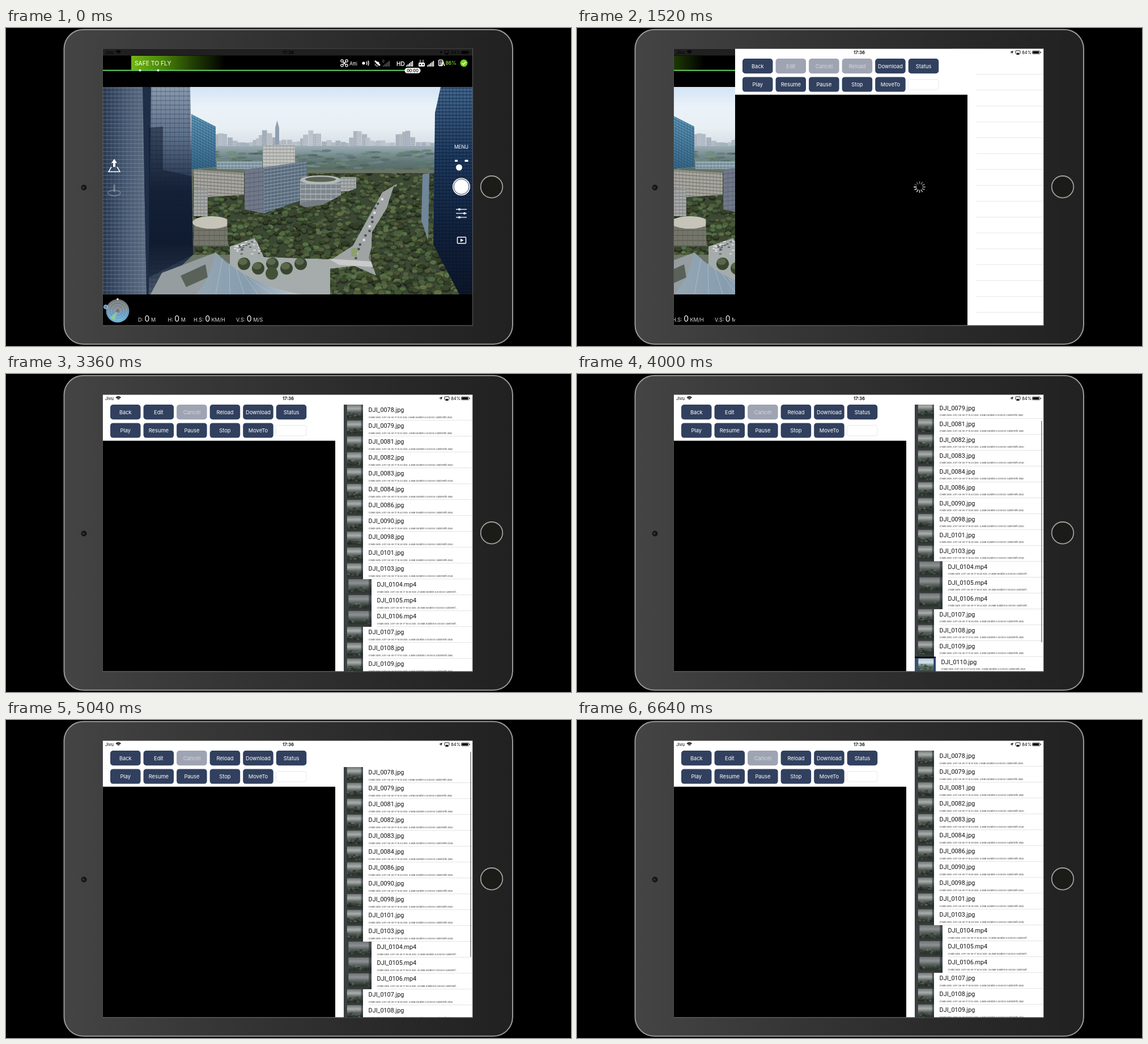
Write an HTML page with a canvas that moves like this. It is 997 px wide and 561 px high and loops after 7200 ms.

```html
<!DOCTYPE html>
<html lang="en">
<head>
<meta charset="utf-8">
<title>Media list</title>
<style>
html, body { margin: 0; width: 100%; height: 100%; overflow: hidden; background: #000; }
canvas { display: block; }
</style>
</head>
<body>
<canvas id="stage" width="997" height="561"></canvas>
<script>
const LOOP = 7200, STEP = 80;
const SCREEN = { x: 171, y: 36.5, w: 652, h: 488 };
const PUSH_START = 1295, PUSH_TIME = 500, LIST_READY = 1900, SCROLL_START = 3840;
const LIST_X = 596, LIST_Y = 54, ROW = 28, LIST_H = 471, SCROLL_MAX = 89;
let c = document.getElementById('stage').getContext('2d');

const clamp = (v, a = 0, b = 1) => Math.min(b, Math.max(a, v));
const smooth = u => { u = clamp(u); return u * u * (3 - 2 * u); };

function seeded(s) {
  return () => (s = (s * 16807) % 2147483647) / 2147483647;
}

const pad = (n, size = 2) => String(n).padStart(size, '0');

function makeFiles() {
  const rnd = seeded(41);
  const ids = [78, 79, 81, 82, 83, 84, 86, 90, 98, 101];
  for (let id = 103; id < 113; id++) ids.push(id);
  return ids.map(id => {
    const bright = id >= 110;
    const ext = id === 112 ? 'mov' : id > 103 && id < 107 ? 'mp4' : 'jpg';
    const video = ext !== 'jpg';
    const secs = bright ? 6 + (id - 110) * 70 : 16 + Math.round((id - 78) * 1.75) * 2;
    const time = `17:${pad((bright ? 32 : 15) + Math.floor(secs / 60))}:${pad(secs % 60)}`;
    const size = (video ? 23 + 15 * rnd() : 3.8 + .7 * rnd()).toFixed(1);
    const length = (video ? 6 + Math.floor(6 * rnd()) : 0).toFixed(6);
    return {
      name: `DJI_${pad(id, 4)}.${ext}`,
      info: `Create Date: 2017-08-${bright ? 10 : '09'} ${time} Size: ${size}MB Duration:${length} `,
      video, bright, width: video ? 49 : bright ? 37 : 34
    };
  });
}

// A quick pull past the edge that springs back.
function bounce(t, start, span) {
  const u = Math.max(0, (t - start) / span);
  return u * Math.exp(1 - u);
}

function scrollAt(t) {
  const glide = smooth((t - SCROLL_START) / 400) - smooth((t - 4680) / 320);
  return SCROLL_MAX * glide + 6 * bounce(t, 4160, 60) - 29 * bounce(t, 4920, 120);
}

function rect(x, y, w, h, fill) {
  c.fillStyle = fill;
  c.fillRect(x, y, w, h);
}

function paint(fill, stroke, width = 1) {
  if (fill) { c.fillStyle = fill; c.fill(); }
  if (stroke) { c.strokeStyle = stroke; c.lineWidth = width; c.stroke(); }
}

function round(x, y, w, h, r, fill, stroke, width) {
  c.beginPath();
  c.roundRect(x, y, w, h, r);
  paint(fill, stroke, width);
}

function oval(x, y, rx, ry, fill, stroke, width) {
  c.beginPath();
  c.ellipse(x, y, rx, ry, 0, 0, Math.PI * 2);
  paint(fill, stroke, width);
}

const circle = (x, y, r, fill, stroke, width) => oval(x, y, r, r, fill, stroke, width);

function arc(x, y, r, mid, half, color, width) {
  c.beginPath();
  c.arc(x, y, r, mid - half, mid + half);
  paint(null, color, width);
}

function trace(points, close) {
  c.beginPath();
  points.split(' ').forEach(p => c.lineTo(...p.split(',').map(Number)));
  if (close) c.closePath();
}

function poly(points, fill) {
  trace(points, true);
  paint(fill);
}

function line(points, color, width = 1) {
  trace(points);
  paint(null, color, width);
}

function fade(x0, y0, x1, y1, ...colors) {
  const g = c.createLinearGradient(x0, y0, x1, y1);
  colors.forEach((color, i) => g.addColorStop(i / (colors.length - 1), color));
  return g;
}

function text(str, x, y, size, color, { align = 'left', weight = 400, face = 'Inter' } = {}) {
  c.font = `${weight} ${size}px ${face}, sans-serif`;
  c.textAlign = align;
  c.fillStyle = color;
  c.fillText(str, x, y);
  return c.measureText(str).width;
}

function clipped(path, draw) {
  c.save();
  path();
  c.clip();
  draw();
  c.restore();
}

function window_(x, y, w, h, draw) {
  clipped(() => { c.beginPath(); c.rect(x, y, w, h); }, draw);
}

function cached(draw) {
  const sheet = document.createElement('canvas');
  sheet.width = 997;
  sheet.height = 561;
  const keep = c;
  c = sheet.getContext('2d');
  draw();
  c = keep;
  return sheet;
}

// Leafy clumps inside an outline, shaded from far to near.
function trees(area, seed) {
  const rnd = seeded(seed);
  clipped(() => trace(area, true), () => {
    rect(330, 250, 493, 220, '#3a4834');
    for (let i = 0; i < 1800; i++) {
      const near = i / 1800, x = 330 + 493 * rnd(), y = 250 + 220 * near;
      const r = 3 + 3 * near + 3 * rnd(), hue = 78 + 24 * rnd(), light = 18 + 19 * rnd();
      oval(x, y + 2, r, r * .7, `hsl(${hue},18%,${light * .65}%)`);
      oval(x, y, r * .8, r * .5, `hsl(${hue},23%,${light}%)`);
    }
  });
}

// A wall whose top and bottom edges lean by the given amounts.
function wall(x, y, w, h, fill, grid, lean = 0, rise = lean, gap = 6) {
  const area = `${x},${y} ${x + w},${y + lean} ${x + w},${y + h + rise} ${x},${y + h}`;
  clipped(() => trace(area, true), () => {
    rect(x, y - 40, w, h + 80, fill);
    for (let px = x; px < x + w; px += gap) rect(px, y - 40, .7, h + 80, grid);
    for (let py = -40; py < h + 40; py += gap) line(`${x},${y + py} ${x + w},${y + py + lean}`, grid, 1.4);
  });
}

function drawSkyline() {
  const rnd = seeded(77);
  rect(171, 104, 652, 116, fade(0, 104, 0, 210, '#d3e4f4', '#eaf2f9', '#e9f0f4', '#d5dee5'));
  for (let x = 368; x < 756; x += 5 + 5 * rnd()) {
    const cluster = Math.max(0, Math.sin((x - 353) / 13)) * 17;
    const y = 203 - cluster - 6 * rnd();
    wall(x, y, 9, 222 - y, `hsl(212,${9 + 6 * rnd()}%,${62 + 12 * rnd()}%)`, 'rgba(225,232,238,.35)', 0, 0, 3);
  }
  poly('475,214 475,176 478.5,163 482,176 482,214', '#8f9fb3');
  rect(327, 208, 440, 60, fade(0, 208, 0, 262, '#9caeb5', '#62777a', '#4f6254'));
  for (let i = 0; i < 220; i++)
    oval(330 + 430 * rnd(), 216 + 45 * rnd(), 9, 2, `hsla(${110 + 80 * rnd()},13%,${27 + 30 * rnd()}%,.5)`);
}

function drawBuildings() {
  wall(372, 235, 80, 14, '#78909d', '#a6b6be');
  wall(453, 206, 57, 44, '#c3c3bf', '#979c9d');
  wall(331, 250, 89, 50, '#a9a69e', '#797c7a', 6, -6);
  wall(331, 283, 25, 49, '#a7a8a6', '#7c8285');
  wall(590, 263, 28, 25, '#a8acaa', '#81898c');
  wall(421, 250, 34, 70, '#717888', '#5b6578', -4, 7, 8);
  wall(455, 246, 76, 81, '#586b7d', '#8494a1', -11, -27);
  wall(519, 270, 72, 42, '#7e878e', '#b4b9ba', 0, 0, 9);
  oval(555, 311, 36, 7, '#747d80');
  oval(555, 268, 36, 8, '#b5b9b8');
  oval(555, 267, 27, 4.5, '#5b6454');
  wall(331, 343, 63, 42, '#75756b', '#5c6056', 0, 0, 9);
  oval(362, 343, 33, 11, '#c6c4b8');
}

function drawStreet() {
  poly('395,378 430,362 460,395 575,408 650,425 690,470 395,470', '#a6abab');
  const rnd = seeded(8);
  for (let i = 0; i < 60; i++) {
    const x = 400 + 50 * rnd(), y = 368 + 30 * rnd();
    rect(x, y, 4, 2, i % 2 ? '#dcdfe0' : '#555d60');
  }
  trees('390,330 455,328 560,312 600,290 665,264 668,285 640,335 612,385 580,408 455,404 440,370 392,386', 21);
  for (let i = 0; i < 5; i++) {
    const x = 420 + i * 25, y = 412 + (i % 2) * 8;
    oval(x, y + 4, 11, 11, '#39462f');
    oval(x - 2, y, 8, 6, '#59684a');
  }
  poly('664,290 690,275 682,304 656,350 640,405 662,470 640,470 622,425 575,408 612,384', '#a0a3a3');
  poly('569,407 648,412 654,422 588,418', '#c9cbca');
  for (let i = 0; i < 14; i++)
    rect(656 - i * 3.4 + 8 * rnd(), 300 + i * 8, 4, 4, i % 3 ? '#4a4f56' : '#e0e2e3');
  rect(609, 388, 11, 15, '#8f9f72');
  trees('684,280 745,272 760,390 810,470 665,470 644,410 646,360 672,318', 31);
  trees('572,425 615,420 660,440 668,470 572,470', 37);
}

function drawTowers() {
  wall(327, 152, 43, 97, fade(0, 150, 0, 250, '#629cbb', '#366687'), 'rgba(30,66,95,.45)', 22, -4, 5);
  wall(171, 104, 78, 366, fade(171, 0, 249, 0, '#26374f', '#44566f', '#5d6c81'), 'rgba(150,165,186,.3)', 0, 0, 7);
  clipped(() => trace('241,104 325,104 330,400 256,470 248,470', true), () => {
    wall(241, 104, 90, 366, fade(0, 104, 0, 470, '#8999ad', '#5a6d87', '#1d2a42', '#141f34', '#4c596d'), 'rgba(22,36,58,.3)', 0, 0, 8);
    poly('241,104 256,104 252,470 241,470', '#1f2e47');
    poly('252,176 277,174 277,250 330,262 330,400 252,440', 'rgba(13,24,44,.5)');
  });
  poly('735,258 747,256 745,375 733,340', '#71869a');
  clipped(() => trace('767,104 823,104 823,470 800,470 754,382 757,150', true), () =>
    wall(752, 104, 72, 366, fade(0, 104, 0, 470, '#41668e', '#1d3a60', '#12233f', '#0c1628'), 'rgba(8,17,34,.45)', 0, 0, 6));
}

function drawRoof() {
  poly('275,432 370,396 372,440 340,470 255,470', '#959da0');
  poly('308,437 352,417 356,440 318,457', '#596159');
  c.beginPath();
  c.moveTo(370, 396);
  c.quadraticCurveTo(430, 455, 522, 470);
  c.lineTo(335, 470);
  c.quadraticCurveTo(362, 440, 370, 396);
  paint(fade(345, 0, 510, 0, '#93a6b4', '#869dae', '#b7c5cd'));
  for (let i = 1; i < 6; i++) line(`${370 + i * 12},${397 + i * 9} ${345 + i * 25},470`, 'rgba(208,220,227,.4)');
  oval(469, 433, 11, 11, '#435237');
}

function drawScene() {
  drawSkyline();
  rect(171, 250, 652, 220, '#6a7365');
  trees('330,256 765,256 765,400 330,400', 5);
  drawBuildings();
  drawStreet();
  drawTowers();
  drawRoof();
}

function bars(x, color) {
  for (let i = 0; i < 5; i++) rect(x + i * 2.6, 66 - i * 2, 1.8, 2 + i * 2, color);
}

function readout(x, label, unit) {
  x += text(label + ' ', x, 518, 9, '#ddd');
  x += text('0', x, 518, 14, '#fff');
  text(' ' + unit, x, 518, 9, '#ddd');
}

function drawTopIcons() {
  for (const dx of [-4, 4]) for (const dy of [-4, 4]) {
    circle(597 + dx, 62 + dy, 2.2, null, '#fff', 1.2);
    line(`597,62 ${597 + dx * .7},${62 + dy * .7}`, '#fff', 1.6);
  }
  text('Atti', 606, 66, 8.8, '#fff');
  circle(631, 62, 2.6, '#fff');
  for (const r of [6, 9]) arc(631, 62, r, 0, .5, '#fff', 1.4);
  line('651,58 660,66', '#fff', 3);
  circle(656, 62, 2.5, '#fff');
  line('651,63 653,67 657,67', '#fff');
  text('0', 664, 61, 6, '#999');
  bars(665, '#555');
  text('HD', 689, 67, 10, '#fff', { weight: 600 });
  bars(706, '#fff');
  round(728, 61, 11, 7, 1.5, '#fff');
  for (const x of [731, 736]) {
    line(`${x},61 ${x},56`, '#fff');
    circle(x, 64.5, 1.2, '#000');
  }
  bars(743, '#fff');
  round(763.5, 56.5, 7, 10, 1, null, '#fff', 1.3);
  for (let y = 59; y < 66; y += 2) rect(765, y, 4, 1, '#fff');
  line('768,67 771,59 774,67', '#fff', 1.5);
  text('86%', 775.5, 65, 8.4, '#7fd320', { weight: 600 });
  circle(808, 62, 6.5, '#79d51c');
  line('805,62 807.3,64.3 811.3,59.8', '#fff', 1.5);
}

function drawControls() {
  poly('191,231 196,238 193,238 193,245 189,245 189,238 186,238', '#fff');
  line('186,245 181,253.5 201,253.5 196,245', '#fff', 1.5);
  c.globalAlpha = .35;
  line('191,276 191,289', '#ddd', 3);
  oval(191, 291, 11, 5, null, '#ddd', 1.5);
  c.globalAlpha = 1;

  text('MENU', 803.5, 213, 8.3, '#fff', { align: 'center' });
  round(792, 232.5, 5, 3.5, 1, '#fff');
  round(809.5, 232.5, 6, 3.5, 1, '#fff');
  circle(799.5, 246, 5.5, '#fff');
  circle(803.5, 280, 15.5, '#fff');
  circle(803.5, 280, 13.5, null, '#27364e');
  for (let i = 0; i < 3; i++) {
    const y = 320 + i * 7;
    line(`794,${y} 813,${y}`, '#fff', 1.3);
    circle(i === 1 ? 809 : 800, y, 2, '#fff');
  }
  round(796.5, 369, 15, 11, 1, null, '#fff', 1.5);
  poly('802,371.5 807.5,374.5 802,377.5', '#fff');
}

function drawRadar() {
  circle(197, 499, 20.5, fade(0, 478, 0, 520, '#707679', '#7f878b', '#66a0c9', '#78b4da'));
  for (const r of [6, 11, 16]) circle(197, 499, r, null, 'rgba(225,230,230,.4)', .8);
  poly('197,499 184,511 191,516', 'rgba(150,220,130,.7)');
  poly('197,495 200,502 197,500 194,502', '#d8372b');
  circle(197, 478.5, 1.8, '#fff');
  circle(176, 492, 3.5, '#4e91ca', '#dceaf5', .8);
}

function drawFlight() {
  rect(SCREEN.x, SCREEN.y, SCREEN.w, SCREEN.h, '#000');
  rect(171, 36.5, 652, 12, '#202020');
  rect(221, 49, 166, 25, fade(221, 0, 387, 0, '#70b612', '#4b8609', '#203c03', '#000'));
  text('SAFE TO FLY', 227, 65.7, 10.3, '#fff');
  rect(171, 73.7, 535, 2.2, '#59c45c');
  for (const x of [236.5, 268.5]) circle(x, 74.8, 2, '#fff');
  round(703.5, 70.3, 28, 9.5, 4.7, '#fff');
  text('00:00', 717.5, 77.6, 7, '#111', { align: 'center', weight: 600 });
  drawTopIcons();
  window_(171, 104, 652, 366, drawScene);
  drawControls();
  drawRadar();
  readout(233, 'D:', 'M');
  readout(285.5, 'H:', 'M');
  readout(331, 'H.S:', 'KM/H');
  readout(406, 'V.S:', 'M/S');
}

function drawDevice() {
  rect(0, 0, 997, 561, '#000');
  round(102.5, 2.8, 791.5, 555, 34, fade(104, 0, 892, 0, '#444', '#363636', '#2b2b2b', '#212121'), '#999', 2);
  circle(137.5, 281.5, 5, '#151515');
  circle(136.5, 281.5, 2, '#333');
  circle(857, 280.3, 19.3, '#1b1b17', '#a0a0a0', 1.8);
  rect(170.5, 36, 653.5, 489.5, '#5c5c5c');
}

function drawStatus() {
  const ink = '#000';
  text('Jivu', 175, 46, 7.6, ink);
  for (const r of [2, 4, 6]) arc(198.3, 46, r, -Math.PI / 2, .8, ink, 1.3);
  text('17:36', 498, 46, 7.8, ink, { align: 'center', weight: 600 });
  poly('770,40 767.5,46 767,43 764,42.7', ink);
  round(774, 40, 8, 5, .8, null, ink, .9);
  poly('778,43 781,47 775,47', ink);
  text('84%', 802, 46, 7.5, ink, { align: 'right' });
  round(803.5, 40.3, 13.5, 5.4, 1.2, null, ink, .7);
  rect(804.4, 41.2, 11, 3.6, ink);
  rect(817.7, 42, 1, 2, ink);
}

function drawButtons(ready) {
  ['Back Edit Cancel Reload Download Status', 'Play Resume Pause Stop MoveTo'].forEach((labels, row) => {
    labels.split(' ').forEach((label, i) => {
      const x = 184 + i * 58.55, y = 54 + row * 32.4;
      const off = label === 'Cancel' || (!ready && /Edit|Reload/.test(label));
      round(x, y, 53.5, 26.2, 5, off ? '#9fa4b3' : '#31405e');
      text(label, x + 26.8, y + 16.6, 9.3, off ? '#d4d7df' : '#fff', { align: 'center' });
    });
  });
  round(476.5, 90.5, 53.5, 18.5, 3, '#fff', '#e8e8e8');
}

function drawSpinner(t) {
  c.save();
  c.translate(496.5, 280.5);
  c.rotate(Math.floor(t / STEP) * Math.PI / 6);
  for (let i = 0; i < 12; i++) {
    round(5, -.9, 5.5, 1.8, .9, `rgba(255,255,255,${.3 + i * .05})`);
    c.rotate(Math.PI / 6);
  }
  c.restore();
}

function drawThumb({ width: w, video, bright }, index, y) {
  const x = LIST_X, inset = bright && !video ? 3 : 0, h = ROW - 2 * inset;
  const tones = bright ? ['#a9c6df', '#d9e3e6', '#546a60', '#506052']
    : ['#6f7374', video ? '#8d9193' : '#aaaeae', '#525b55', '#2a322c', '#3b413d'];
  rect(x, y, w, ROW, '#000');
  rect(x, y + inset, w, h, fade(0, y + inset, 0, y + inset + h, ...tones));
  const rnd = seeded(index + 11);
  for (let i = 0; i < 16; i++)
    rect(x + (w - 4) * rnd(), y + 13 + 9 * rnd(), 4, 2, i % 2 ? 'rgba(25,32,26,.5)' : 'rgba(130,138,132,.4)');
  rect(x, y + inset, w * .17, h, bright ? '#38526f' : '#3b3f42');
  rect(x + w * .9, y + inset, w * .1, h, bright ? '#2a496d' : 'rgba(40,46,52,.6)');
}

function drawRow(file, index, y, loaded) {
  const x = LIST_X + (loaded ? file.width : 28) + 9.6;
  if (loaded) drawThumb(file, index, y);
  else {
    rect(LIST_X, y, 28, ROW, '#e2e2e2');
    circle(LIST_X + 14, y + 14, 6, '#c6c6c6');
  }
  text(file.name, x, y + 13.4, 10.8, '#111', { face: 'Roboto' });
  const tail = loaded && file.video ? 'customInf…' : 'customInfo:(null)';
  text(file.info + tail, x, y + 23.6, 3.8, '#333');
  rect(x, y + ROW - .6, 823 - x, .7, '#d8d8d8');
}

function drawScrollbar(t, offset) {
  if (t < SCROLL_START) return;
  const over = Math.max(0, -offset, offset - SCROLL_MAX), length = 391 - over;
  const y = 56 + clamp(offset / SCROLL_MAX) * (466 - length);
  round(819, y, 2, length, 1, `rgba(110,110,110,${.7 * clamp((5760 - t) / 240)})`);
}

function drawList(t) {
  if (t < LIST_READY) {
    for (let i = 1; i < 17; i++) rect(LIST_X, LIST_Y + i * ROW - .6, 227, .7, '#dcdcdc');
    return;
  }
  const offset = scrollAt(t);
  files.forEach((file, i) => drawRow(file, i, LIST_Y + i * ROW - offset, t >= 1930 + i * 65));
  drawScrollbar(t, offset);
}

function drawMedia(t) {
  const ready = t >= LIST_READY;
  rect(SCREEN.x, SCREEN.y, SCREEN.w, SCREEN.h, '#fff');
  drawButtons(ready);
  rect(171, 117.7, 410, 407, '#000');
  if (!ready) drawSpinner(t);
  window_(581, LIST_Y, 242, LIST_H, () => drawList(t));
}

const files = makeFiles();
const device = cached(drawDevice), flight = cached(drawFlight);

function render(t) {
  c.drawImage(device, 0, 0);
  const left = 1 - clamp((t - PUSH_START) / PUSH_TIME), push = 1 - left ** 3;
  window_(SCREEN.x, SCREEN.y, SCREEN.w, SCREEN.h, () => {
    if (push < 1) c.drawImage(flight, Math.round(-.3 * SCREEN.w * push), 0);
    if (push > 0) {
      c.save();
      c.translate(Math.round(SCREEN.w * (1 - push)), 0);
      drawMedia(t);
      c.restore();
    }
    drawStatus();
  });
}

function tick() {
  const t = performance.now() % LOOP;
  render(Math.floor(t / STEP) * STEP);
  requestAnimationFrame(tick);
}
tick();
</script>
</body>
</html>
```
